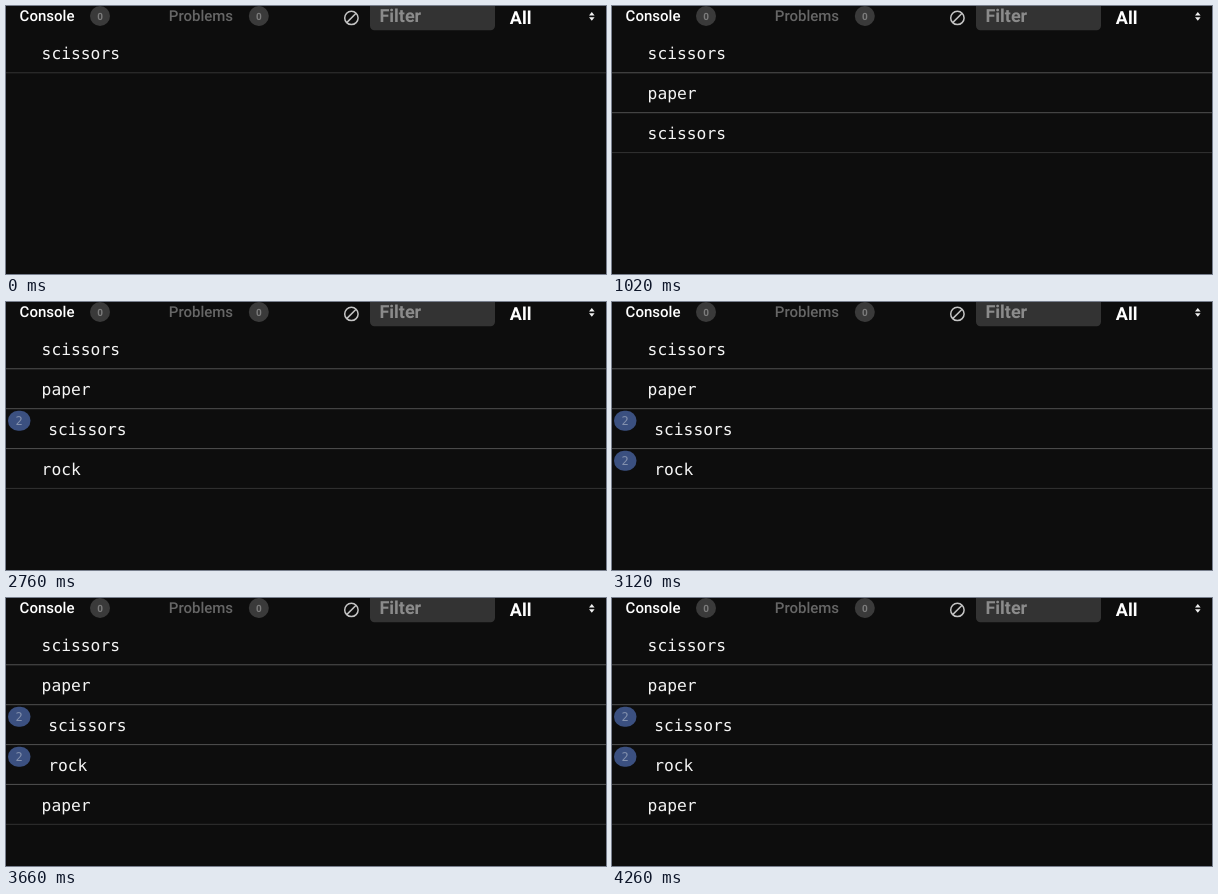
Write an HTML page that moves like this. It is 600 px wide and 268 px high and loops after 4440 ms.

```html
<!DOCTYPE html>
<html lang="en">
<head>
<meta charset="utf-8">
<title>Console</title>
<style>
  html, body { margin: 0; width: 100%; height: 100%; overflow: hidden; background: #0d0d0d; }
  svg { display: block; width: 600px; height: 268px; }
  text { white-space: pre; text-rendering: geometricPrecision; }
  .ui { font-family: Roboto, sans-serif; font-weight: 500; font-size: 15px; }
  .big { font-weight: 600; font-size: 18px; }
  .count { font-weight: 600; font-size: 10px; fill: #7c7c7c; text-anchor: middle; }
  .log { font: 16.3px "DejaVu Sans Mono", Menlo, monospace; fill: #f4f4f4; }
  .rep { font: 12px "DejaVu Sans Mono", Menlo, monospace; fill: #8491ad; text-anchor: middle; }
</style>
</head>
<body>
<svg viewBox="0 0 600 268">
  <rect width="600" height="268" fill="#0d0d0d"/>
  <g class="ui">
    <text x="13.6" y="15.3" fill="#fff">Console</text>
    <circle cx="94" cy="10" r="10" fill="#3a3a3a"/>
    <text class="count" x="94" y="13.6">0</text>
    <text x="162.8" y="15.3" fill="#666">Problems</text>
    <circle cx="252.8" cy="10" r="10" fill="#3a3a3a"/>
    <text class="count" x="252.8" y="13.6">0</text>
    <g fill="none" stroke="#c4c4c4" stroke-width="1.5">
      <circle cx="345.4" cy="11.9" r="6.7"/>
      <path d="M350.1 7.2 340.7 16.6"/>
    </g>
    <rect x="364" y="-10" width="125" height="34.3" rx="4.5" fill="#333"/>
    <text class="big" x="373.4" y="16.3" fill="#8b8b8b">Filter</text>
    <text class="big" x="503.8" y="18" fill="#fff">All</text>
    <path d="M583 9.5 585.8 6 588.6 9.5zM583 11.3 585.8 14.8 588.6 11.3z" fill="#f0f0f0"/>
  </g>
  <g id="rows"></g>
</svg>
<script>
const LOOP = 4440, PITCH = 39.9;
// text, time shown, time the repeat badge appears
const entries = [
  ["scissors", 0],
  ["paper", 420],
  ["scissors", 1020, 2400],
  ["rock", 2700, 3120],
  ["paper", 3540]
];

function add(parent, tag, attrs, text) {
  const el = document.createElementNS("http://www.w3.org/2000/svg", tag);
  for (const key in attrs) el.setAttribute(key, attrs[key]);
  if (text) el.textContent = text;
  return parent.appendChild(el);
}

const rows = entries.map(([label, start, repeat = Infinity], i) => {
  const y = i * PITCH;
  const group = add(document.getElementById("rows"), "g", {});
  const line = add(group, "rect", { x: 0, y: 66.2 + y, width: 600, height: 1.1 });
  const text = add(group, "text", { class: "log", y: 52.9 + y }, label);
  const badge = add(group, "g", {});
  add(badge, "rect", { x: 2, y: 29 + y, width: 22.5, height: 20, rx: 10, fill: "#3b5080" });
  add(badge, "text", { class: "rep", x: 13.2, y: 43.4 + y }, "2");
  return { group, line, text, badge, start, repeat };
});

const show = (el, on) => el.setAttribute("visibility", on ? "visible" : "hidden");

function draw(now) {
  const t = now % LOOP;
  rows.forEach((row, i) => {
    const on = t >= row.start, repeated = on && t >= row.repeat;
    const next = rows[i + 1];
    show(row.group, on);
    show(row.badge, repeated);
    row.text.setAttribute("x", repeated ? 42.2 : 35.6);
    row.line.setAttribute("fill", next && t >= next.start ? "#4a4a4a" : "#2e2e2e");
  });
}

const origin = performance.now();
function tick() {
  draw(performance.now() - origin);
  requestAnimationFrame(tick);
}
tick();
</script>
</body>
</html>
```
